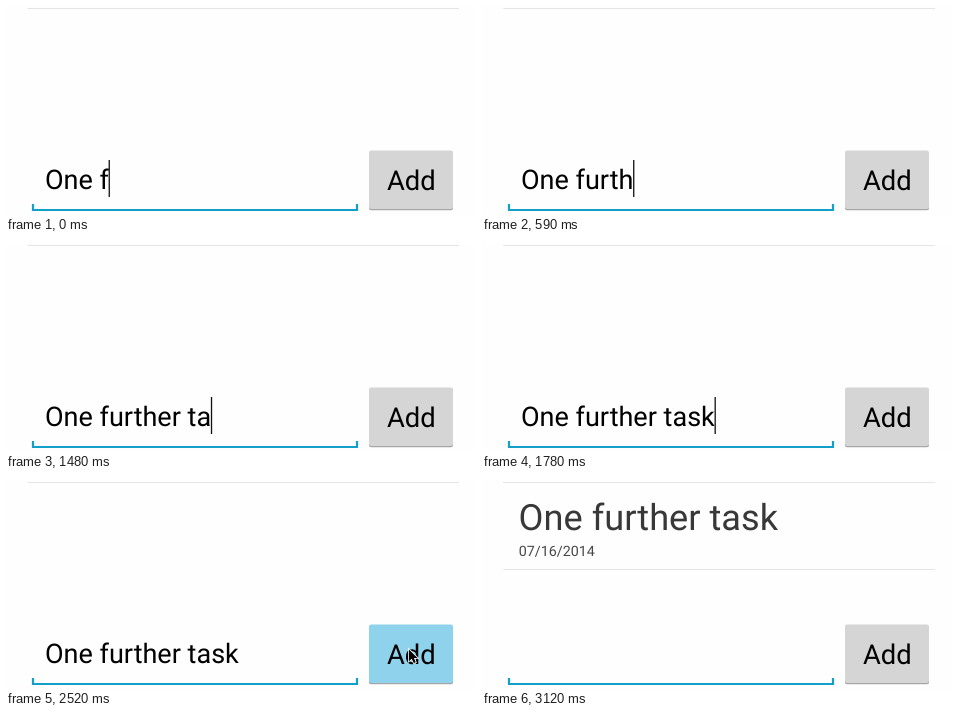
Animation, 470 px wide and 209 px high, one loop 3.24 s. Source, as an HTML page:

```html
<!DOCTYPE html>
<html lang="en">
<head>
<meta charset="utf-8">
<title>Adding a task</title>
<style>
  html, body { margin: 0; width: 100%; height: 100%; overflow: hidden; background: #fefefe; }
  svg { display: block; width: 470px; height: 209px; }
  text { font-family: Roboto, sans-serif; font-size: 27.05px; text-rendering: geometricPrecision; white-space: pre; }
  .rule { fill: #e5e5e5; }
</style>
</head>
<body>
<svg viewBox="0 0 470 209">
  <rect class="rule" x="21.5" y="2" width="431.5" height="1"/>

  <g id="item">
    <text x="36.6" y="50" fill="#383838" style="font-size:36.2px">One further task</text>
    <text x="36.8" y="76" fill="#484848" style="font-size:14.3px">07/16/2014</text>
    <rect class="rule" x="21.5" y="89" width="431.5" height="1"/>
  </g>

  <text id="field" x="38.9" y="183"></text>
  <rect id="caret" y="154" width="1.3" height="37" fill="#111"/>
  <path d="M27 198V204H351V198" fill="none" stroke="#12a0ca" stroke-width="2.2"/>

  <rect x="363" y="146" width="84" height="58.3" rx="2" fill="#a6a6a6"/>
  <rect id="face" x="363" y="144.4" width="84" height="58.6" rx="2"/>
  <text x="380.9" y="184" style="font-size:27.4px">Add</text>

  <path id="mouse" d="M.9 1.4V13.2L3.7 10.7L5.8 15L7.8 14.2L5.9 9.9H9.6Z" fill="#000" stroke="#fff" stroke-width="1.6" paint-order="stroke"/>
</svg>
<script>
  const LOOP = 3240, STEP = 148.6;
  const ENTER = 14, PRESS = 17, ADDED = 18, LEAVE = 19;
  const KEYS = 'One f|u|r|t|h|e|r ||t||a|s|k'.split('|'); // typed at each step
  const [item, field, caret, face, mouse] =
    ['item', 'field', 'caret', 'face', 'mouse'].map(id => document.getElementById(id));

  const show = (el, on) => el.setAttribute('visibility', on ? 'visible' : 'hidden');

  function draw(t) {
    const step = Math.floor((t + 8) / STEP);
    const added = step >= ADDED;

    field.textContent = added ? '' : KEYS.slice(0, step + 1).join('');
    caret.setAttribute('x', 38.6 + field.getComputedTextLength());
    show(caret, step <= ENTER || Math.floor(step / 3) % 2 === 0);
    show(item, added);
    face.setAttribute('fill', step === PRESS ? '#8fd2ec' : '#d5d5d5');

    // The pointer slows down onto the button, then drops away
    const left = 1 - Math.min(1, Math.max(0, (step - ENTER) / 2));
    const far = left ** 1.4, drop = step === LEAVE ? 1 : 0;
    mouse.setAttribute('transform',
      `translate(${402 + 66 * far + 16 * drop} ${168 - 22 * far + 21 * drop})`);
    show(mouse, step >= ENTER && step <= LEAVE);
  }

  const start = performance.now();
  function tick() {
    draw((performance.now() - start) % LOOP);
    requestAnimationFrame(tick);
  }
  tick();
</script>
</body>
</html>
```
